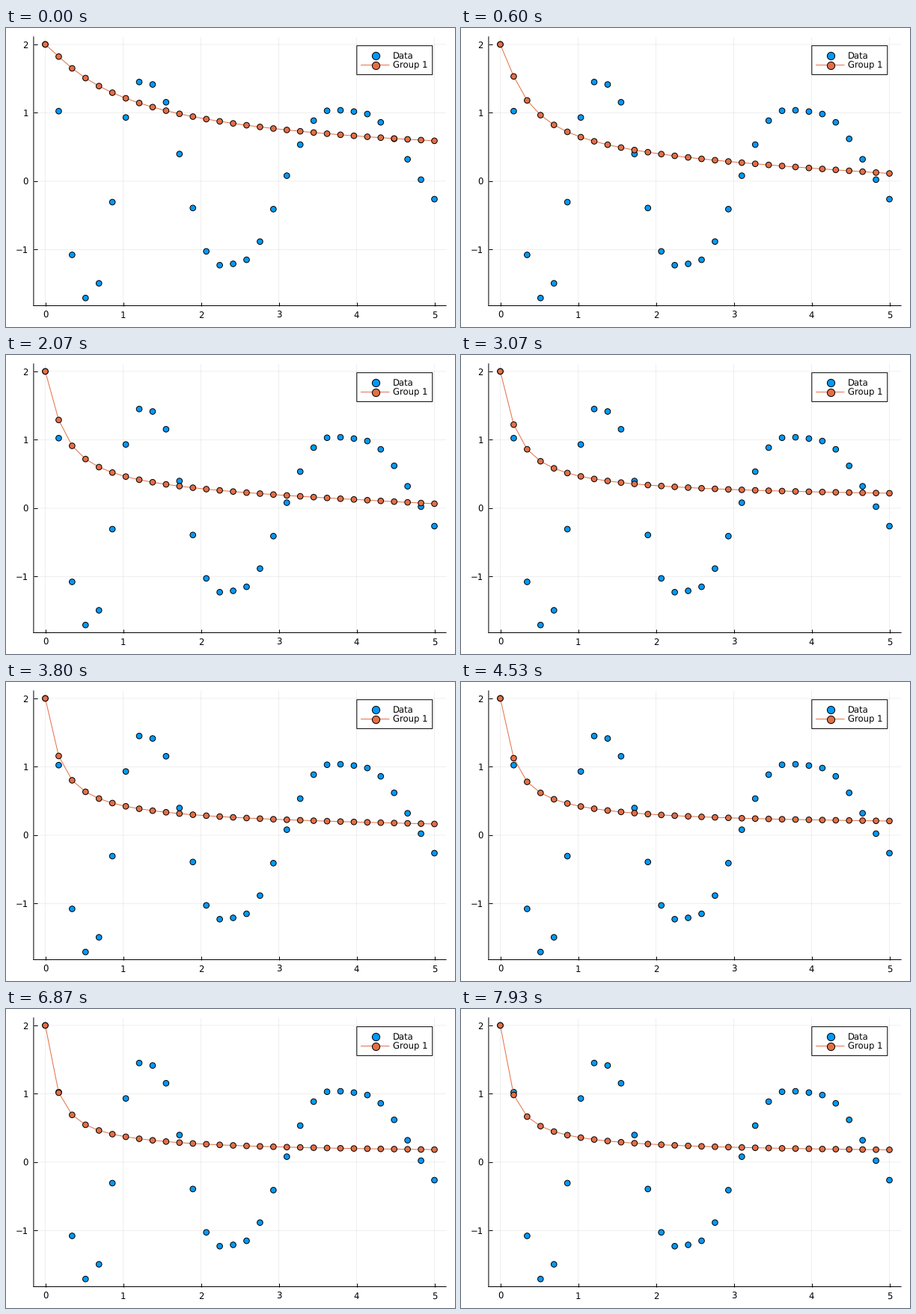
These frames come from a looping animation (600x400 px, 8 s). A matplotlib script:

```python
import numpy as np
import matplotlib.pyplot as plt
from matplotlib.animation import FuncAnimation
from matplotlib.patches import Rectangle

W, H, DPI = 600, 400, 100
PX = 72 / DPI                      # one pixel in points
FRAMES, LOOP = 120, 8000
BLUE, ORANGE = "#009afa", "#e36f47"
N = 30
T = np.linspace(0, 5, N)

plt.rcParams["font.family"] = "DejaVu Sans"
plt.rcParams["text.hinting"] = "none"


def spiral(steps=60):
    """First component of the damped cubic spiral, by RK4."""
    def rate(u):
        a, b = u ** 3
        return np.array([-0.1 * a - 2 * b, 2 * a - 0.1 * b])

    h = T[1] / steps
    u = np.array([2.0, 0.0])
    out = [u[0]]
    for _ in range(N - 1):
        for _ in range(steps):
            k1 = rate(u)
            k2 = rate(u + h / 2 * k1)
            k3 = rate(u + h / 2 * k2)
            k4 = rate(u + h * k3)
            u = u + h / 6 * (k1 + 2 * k2 + 2 * k3 + k4)
        out.append(u[0])
    return np.array(out)


def bend(x):
    """How much each point takes part in the swing; 1 at the right end."""
    u = x / 5
    return (1 - np.exp(-x / 0.12)) * (0.22 + 0.5 * u + 0.28 * u ** 2)


def prediction(t):
    """Fitted curve after t seconds: a decay that steepens, plus a dying swing."""
    floor = 0.1 + 0.08 * np.exp(-t / 2) - 0.13 * np.exp(-t / 0.3)
    power = 1.5 - 0.3 * np.exp(-t / 0.3)
    steep = np.exp(0.555 + 0.7 * np.log1p(t / 0.064))
    decay = floor + (2 - floor) / np.sqrt(1 + steep * T ** power)

    wave = np.cos(2 * np.pi * (t - 1.9) / 1.8) + 0.75
    swing = -0.617 * np.exp(-0.8 * t) * (1 - np.exp(-t / 0.1)) * wave
    return decay + swing * bend(T)


def dots(axes, x, y, color, size, z):
    # One size per point keeps the dots at sub-pixel positions.
    return axes.scatter(x, y, s=np.full(len(x), (size * PX) ** 2), c=color,
                        edgecolors="black", linewidths=PX, zorder=z,
                        clip_on=False)


fig = plt.figure(figsize=(W / DPI, H / DPI), dpi=DPI, facecolor="white")

left, right, top, bottom = 36.9, 588.1, 11.8, 371.5
ax = fig.add_axes([left / W, 1 - bottom / H, (right - left) / W, (bottom - top) / H])
ax.set_xticks(range(6))
ax.set_yticks(range(-1, 3))
ax.tick_params(direction="in", length=5 * PX, width=PX, pad=7 * PX,
               labelsize=11.6 * PX)
ax.grid(color="black", alpha=0.1, lw=0.6 * PX, snap=False)
ax.set_axisbelow(True)
for side in ("top", "right"):
    ax.spines[side].set_visible(False)
for side in ("left", "bottom"):
    ax.spines[side].set(linewidth=PX, snap=False)

start = prediction(0)
dots(ax, T, spiral(), BLUE, 7.6, 3)
line, = ax.plot(T, start, color=ORANGE, lw=PX, zorder=4)
fit = dots(ax, T, start, ORANGE, 7.6, 5)
ax.set_xlim(-0.15, 5.15)
ax.set_ylim(-1.821, 2.111)

# Legend, in pixel units.
key = fig.add_axes([0, 0, 1, 1])
key.add_patch(Rectangle((468.8, 23.7), 101, 38.7, fc="white", ec="black",
                        lw=PX, snap=False))
key.plot([474.5, 512], [49.6, 49.6], color=ORANGE, lw=PX, snap=False)
for y, color, label in ((36.8, BLUE, "Data"), (49.6, ORANGE, "Group 1")):
    dots(key, [493.5], [y], color, 10.2, 5)
    key.text(517, y + 4.2, label, size=11.6 * PX, va="baseline")
key.set_xlim(0, W)
key.set_ylim(H, 0)
key.axis("off")


def update(n):
    y = prediction(n * LOOP / FRAMES / 1000)
    line.set_ydata(y)
    fit.set_offsets(np.column_stack([T, y]))
    return line, fit


anim = FuncAnimation(fig, update, frames=FRAMES, interval=LOOP / FRAMES,
                     repeat=True, repeat_delay=0, blit=False)
plt.show()
```
